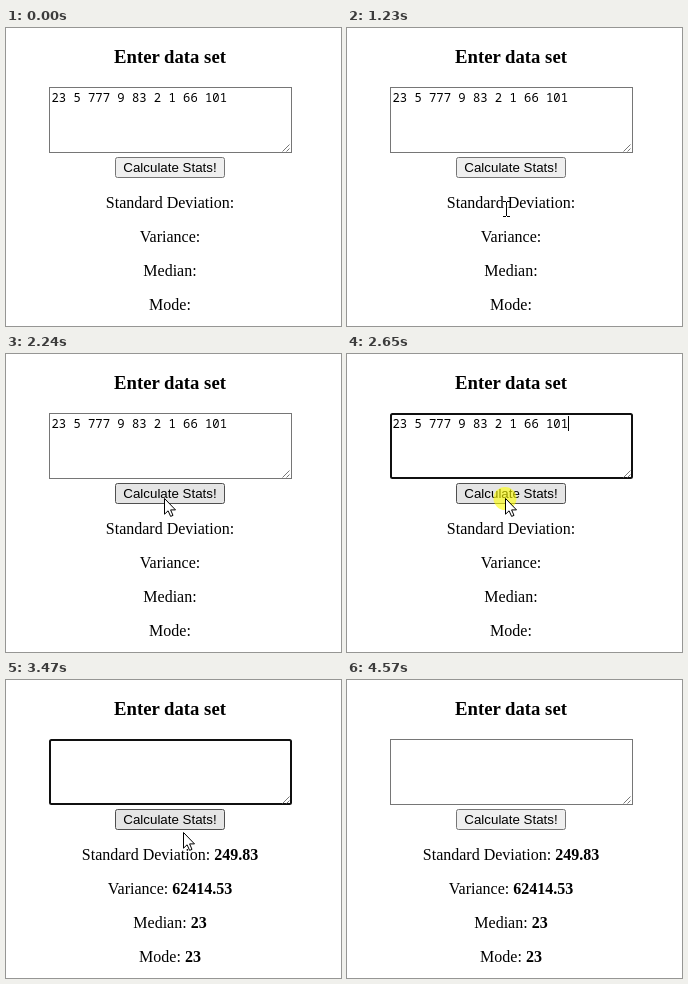
Write an HTML page that moves like this. It is 335x298 px and loops after 4.64 s.

```html
<!DOCTYPE html>
<html lang="en">
<head>
<meta charset="utf-8">
<title>Data set statistics</title>
<style>
  html, body { margin: 0; width: 100%; height: 100%; overflow: hidden; background: #fff; }
  svg { display: block; }
  text { white-space: pre; }
  .serif { font: 16px "Liberation Serif", serif; text-anchor: middle; }
  .serif.title { font-size: 18.72px; font-weight: bold; }
  .bold { font-weight: bold; }
  .mono { font: 12.2px "Noto Sans Mono", monospace; }
  .label { font: 13.333px "Liberation Sans", sans-serif; text-anchor: middle; }
</style>
</head>
<body>
<svg width="335" height="298" viewBox="0 0 335 298">
  <text class="serif title" x="164" y="35">Enter data set</text>

  <rect id="field" fill="#fff"/>
  <path d="M276.5 123.5l7-7M280.5 123.5l3-3" stroke="#777" fill="none"/>
  <text id="input" class="mono" x="45.5" y="74">23 5 777 9 83 2 1 66 101</text>
  <rect id="caret" y="62" width="1" height="15"/>

  <rect id="button" x="109.5" y="129.5" width="109" height="20" rx="2"/>
  <text class="label" x="164" y="144">Calculate Stats!</text>

  <g id="results"></g>

  <circle id="click" cx="158" cy="144.5" r="11.5" fill="#ff0" fill-opacity=".6"/>
  <g id="pointer">
    <path id="arrow" d="M.5 .5V16.2L4.1 12.8L6.6 18.4L9 17.4L6.6 11.9H11.5Z" fill="#fff" stroke="#000"/>
    <path id="beam" d="M-3 -7.5H0M1 -7.5H4M.5 -7V7M-3 7.5H0M1 7.5H4" fill="none" stroke="#000"/>
  </g>
</svg>
<script>
const LOOP = 4640;
const $ = id => document.getElementById(id);
const set = (id, attrs) => Object.entries(attrs).forEach(([k, v]) => $(id).setAttribute(k, v));
const show = (id, on) => set(id, { visibility: on ? "inherit" : "hidden" });
const during = (t, a, b) => t >= a && t < b;

// Half widths before and after the value appears decide where the text beam shows.
const lines = [
  { label: "Standard Deviation:", value: "249.83", half: [64, 88] },
  { label: "Variance:", value: "62414.53", half: [30, 62] },
  { label: "Median:", value: "23", half: [27, 37] },
  { label: "Mode:", value: "23", half: [21, 31] },
].map((line, i) => ({ ...line, y: 180 + 34 * i }));

$("results").innerHTML = lines.map(l =>
  `<text class="serif" x="164" y="${l.y}">${l.label}<tspan class="bold"></tspan></text>`).join("");
const values = [...document.querySelectorAll("#results tspan")];

// Pointer moves: first step, last step, step count, x, y, easing power
const entry = [275, 300];
const moves = [
  [210, 670, 8, 178, 223, .7],
  [770, 1230, 8, 159, 181, 1],
  [1250, 1250, 1, 159, 177, 1],
  [1350, 1840, 9, 156, 149, .8],
  [1870, 1870, 1, 156, 148, 1],
  [1920, 2240, 5, 158, 144, 1],
  [3290, 3470, 4, 177, 152, 1.4],
  [3530, 3810, 5, 324, 238, 1],
];

function pointerAt(t) {
  let [x, y] = entry;
  for (const [start, end, steps, toX, toY, power] of moves) {
    if (t < start) break;
    const interval = (end - start) / (steps - 1) || 1;
    const step = Math.min(steps, 1 + Math.floor((t - start) / interval + 1e-6));
    const p = (step / steps) ** power;
    x += (toX - x) * p;
    y += (toY - y) * p;
  }
  return [Math.round(x), Math.round(y)];
}

function draw(t) {
  const done = t >= 2690;
  const focused = during(t, 2650, 4570);
  const inset = focused ? 1 : .5;
  set("field", {
    x: 43 + inset, y: 59 + inset, width: 243 - 2 * inset, height: 66 - 2 * inset,
    rx: focused ? 1.5 : 0, "stroke-width": 2 * inset, stroke: focused ? "#101010" : "#767676",
  });
  show("input", !done);
  set("caret", { x: done ? 46 : 221 });
  show("caret", during(t, 2650, 3290) || during(t, 3740, 4220));
  values.forEach((v, i) => v.textContent = done ? " " + lines[i].value : "");

  const [x, y] = pointerAt(t);
  const visible = during(t, 210, 3910);
  const hover = visible && during(y, 129, 153) && during(x, 109, 219);
  set("button", { fill: hover ? "#e5e5e5" : "#efefef", stroke: hover ? "#4f4f4f" : "#767676" });

  const overText = lines.some(l => during(y, l.y - 14, l.y + 4) && Math.abs(x - 164) < l.half[+done]);
  set("pointer", { transform: `translate(${x} ${y})` });
  show("pointer", visible);
  show("beam", overText);
  show("arrow", !overText);
  show("click", during(t, 2650, 2790));
}

const origin = performance.now();
function frame() {
  draw((performance.now() - origin) % LOOP);
  requestAnimationFrame(frame);
}
frame();
</script>
</body>
</html>
```
